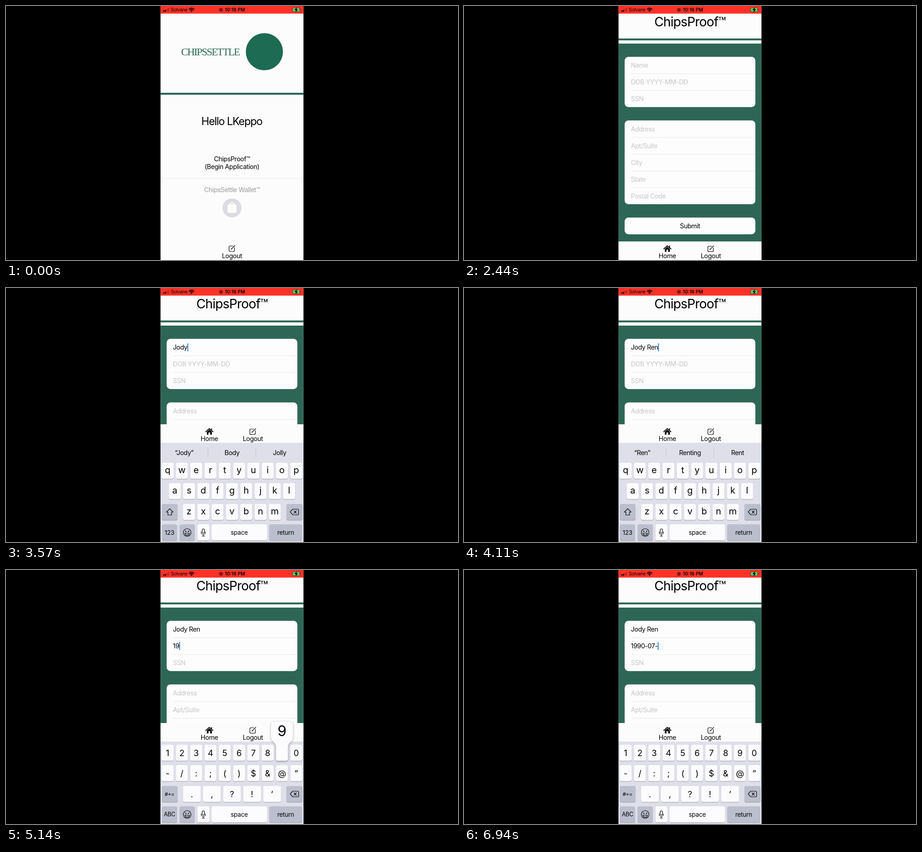
Recreate the animation shown at these times as an HTML page. Size 998 by 561 pixels, loop 6.97 s.

```html
<!DOCTYPE html>
<html lang="en">
<head>
<meta charset="utf-8">
<title>Sign-up form</title>
<style>
  html, body { margin: 0; width: 100%; height: 100%; overflow: hidden; background: #000; }
  svg { display: block; width: 100vw; height: 100vh; }
  text { font: 14.3px Inter, "Open Sans", sans-serif; letter-spacing: -.03em; white-space: pre; }
  .mid, .key, .sym, .small { text-anchor: middle; }
  .key { font-size: 20px; letter-spacing: 0; }
  .sym { font-size: 18.5px; letter-spacing: 0; }
  .small { font-size: 13.6px; letter-spacing: -.02em; }
  .hint { fill: #c6c6ca; }
  .line { fill: none; stroke: #000; stroke-width: 1.2; stroke-linecap: round; stroke-linejoin: round; }
  .rule { stroke: #e9e9ee; }
  #pop { filter: drop-shadow(0 1px 2px rgba(0, 0, 0, .35)); }
</style>
</head>
<body>
<svg viewBox="0 0 998 561">
  <defs>
    <clipPath id="phone"><rect x="341.2" width="315.6" height="561"/></clipPath>
    <g id="logout">
      <path class="line" d="M2 -5.5H-4.5Q-6.5 -5.5 -6.5 -3.5V4.500Q-6.5 6.500 -4.5 6.500H3.500Q5.500 6.500 5.500 4.500V-2M-1.500 1.500L6.500 -6.500M-2 2.200L-1.500 .8"/>
      <text class="mid" y="21">Logout</text>
    </g>
  </defs>
  <rect width="998" height="561"/>
  <g clip-path="url(#phone)">
    <rect x="341" width="316" height="561" fill="#fcfcfc"/>

    <g id="home">
      <text class="mid" x="451" y="109" fill="#2b6a57" style="font:23px 'Liberation Serif',serif;letter-spacing:-1.8px">CHIPSSETTLE</text>
      <circle cx="570.5" cy="101" r="41" fill="#1d6b52"/>
      <rect x="341" y="191.700" width="316" height="4.200" fill="#276354"/>
      <text class="mid" x="498.5" y="263" style="font-size:23.6px;letter-spacing:-.05em">Hello LKeppo</text>
      <text class="mid" x="499" y="343">ChipsProof™</text>
      <text class="mid" x="499" y="360">(Begin Application)</text>
      <path class="rule" d="M341 381H657"/>
      <text class="mid" x="499" y="411" fill="#9c9ca0">ChipsSettle Wallet™</text>
      <circle cx="499" cy="446" r="21" fill="#dbdbe1"/>
      <rect x="489" y="438" width="20" height="19" rx="4" fill="#fcfcfc"/>
      <path d="M494.500 439V438a4.500 4 0 0 1 9 0V439" fill="none" stroke="#fcfcfc" stroke-width="1.8"/>
      <use href="#logout" x="499" y="535.5"/>
    </g>

    <g id="auth">
      <rect x="341" y="83" width="316" height="440" fill="#2e6655"/>
      <text class="mid" x="499" y="45" style="font-size:28.400px">ChipsProof™</text>
      <rect x="341" y="71.700" width="316" height="4.200" fill="#2e6655"/>
      <g id="cards"></g>
      <rect x="354.7" y="467.2" width="288.6" height="37" rx="8.4" fill="#fdfdfe"/>
      <text class="mid" x="499" y="491">Submit</text>
      <rect id="caret" width="2" height="18" rx="1" fill="#2c83d6"/>
      <g id="nav">
        <rect x="341" y="520" width="316" height="41" fill="#fcfcfc"/>
        <path d="M441 536.500L449 529.500L457 536.500M454 533V529.500" class="line" style="stroke-width:1.7"/>
        <path d="M443.500 536.500L449 531.800L454.500 536.500V543H451V538H447V543H443.500Z"/>
        <text class="mid" x="449" y="557">Home</text>
        <use href="#logout" x="545" y="536"/>
      </g>
      <rect id="board" x="341" width="316" height="230" fill="#dedfe9"/>
      <g id="keys">
        <g id="letters"></g>
        <g id="numbers"></g>
        <g id="shared"></g>
      </g>
      <g id="pop"><path id="bubble" fill="#fcfcfe"/><text id="glyph" class="mid" style="font-size:32px;letter-spacing:0"></text></g>
    </g>

    <g id="status">
      <rect x="341" width="316" height="16.800" fill="#ff3127"/>
      <path d="M347 10h2.500v2.500h-2.500zM350.500 8.500h2.500v4h-2.500z"/>
      <path d="M354 6.500h2.500v6h-2.500zM357.500 4.500h2.500v8h-2.500z" opacity=".3"/>
      <text x="364" y="12.300" style="font-size:10.300px">Solvane</text>
      <path class="line" style="stroke-width:1.8;stroke-linecap:butt" d="M404 7.500Q409.500 2 415.500 7.500M406.200 9.700Q409.700 6.300 413.300 9.700"/>
      <circle cx="409.700" cy="11.300" r="1.500"/>
      <circle cx="474.700" cy="8.600" r="3.600" fill="none" stroke="#000"/>
      <circle cx="474.700" cy="8.600" r="1.700"/>
      <text class="mid" x="505.500" y="12.300" style="font-size:10.400px;font-weight:600;letter-spacing:0">10:16 PM</text>
      <rect x="633" y="4" width="15.500" height="8.500" rx="2" fill="#58d866" stroke="#6b2a20"/>
      <path d="M649.500 6.500v3.500" stroke="#6b2a20" stroke-width="1.5"/>
      <path d="M642.500 2.800L636.500 9h3.700L639 13.700L645 7.500h-3.700Z"/>
    </g>
  </g>
</svg>
<script>
const LOOP = 6970, OPEN = 920, FOCUS = 2490, SWITCH = 4440, HOLD = 90;
const TALL = 219, SHORT = 182, PITCH = 31.57;
const ROWS = [386, 431, 477, 522];
const $ = id => document.getElementById(id);

const label = (x, y, str, cls, id = '') =>
  `<text x="${x}" y="${y}" class="${cls}" ${id && `id="${id}"`}>${str}</text>`;

// Form cards
const card = (top, fields) => {
  let out = `<rect x="354.7" y="${top}" width="288.6" height="${fields.length * 37}" rx="8.4" fill="#fdfdfe"/>`;
  fields.forEach((name, i) => {
    const y = top + i * 37;
    if (i) out += `<path class="rule" d="M368 ${y + .5}H643"/>`;
    out += label(368.5, y + 24, name, 'hint', 'f' + name.slice(0, 3));
  });
  return out;
};
$('cards').innerHTML = card(112.2, ['Name', 'DOB YYYY-MM-DD', 'SSN']) +
  card(252.8, ['Address', 'Apt/Suite', 'City', 'State', 'Postal Code']);

// Keyboards
const spots = { letters: {}, numbers: {} };
const cap = (x, top, w, fill = '#fcfcfe', id = '') =>
  `<rect x="${x}" y="${top + 1}" width="${w}" height="35.500" rx="4" fill="#9698a2"/>` +
  `<rect x="${x}" y="${top}" width="${w}" height="35.500" rx="4" fill="${fill}" ${id && `id="${id}"`}/>`;
const DARK = '#bbbfcd';
const row = (set, chars, r, first, cls, base, pitch = PITCH, w = 26.5) =>
  [...chars].map((c, i) => {
    const x = first + i * pitch;
    spots[set][c] = [x, ROWS[r]];
    return cap(x - w / 2, ROWS[r], w) + label(x, ROWS[r] + base, c === '&' ? '&amp;' : c, cls);
  }).join('');

$('letters').innerHTML =
  '<path d="M446 353V374M551.500 353V374" stroke="#c3c5d0"/>' +
  [393.5, 499, 604].map((x, i) => label(x, 369, '', 'mid', 's' + i)).join('') +
  row('letters', 'qwertyuiop', 0, 356.8, 'key', 23) +
  row('letters', 'asdfghjkl', 1, 372.6, 'key', 23) +
  row('letters', 'zxcvbnm', 2, 404.1, 'key', 23) +
  cap(344, 477, 35, DARK, 'shift') +
  '<path id="arrow" class="line" d="M361.500 487.500L369 495H365.500V501.500H357.500V495H354Z"/>' +
  label(361, 545, '123', 'small');
$('numbers').innerHTML =
  row('numbers', '1234567890', 0, 356.8, 'sym', 24.5) +
  row('numbers', '-/:;()$&@”', 1, 356.8, 'sym', 24.5) +
  row('numbers', '.,?!’', 2, 410.5, 'sym', 24.5, 44.25, 39.5) +
  cap(344, 477, 35, DARK) +
  '<text x="361" y="499" class="small" style="font-size:11px;font-weight:500">#+=</text>' +
  '<text x="361" y="544" class="small" style="font-size:12.5px">ABC</text>';
$('shared').innerHTML =
  cap(619, 477, 35.5, DARK) +
  '<path class="line" d="M627.500 494.500L633 488.500H644Q646 488.500 646 490.500V499Q646 501 644 501H633ZM636 492L641 497.500M641 492L636 497.500"/>' +
  cap(383, 522, 34, DARK) +
  '<circle class="line" cx="400" cy="540" r="8.500"/><circle cx="397" cy="537.500" r="1.300"/><circle cx="403" cy="537.500" r="1.300"/>' +
  '<path class="line" d="M395 541.500H405Q404 546 400 546T395 541.500Z"/>' +
  cap(422.5, 522, 26.5) +
  '<rect class="line" x="433.200" y="532" width="5" height="9.500" rx="2.500"/>' +
  '<path class="line" d="M431 538.500V540a4.700 4.500 0 0 0 9.400 0V538.500M435.700 544.500V548M433 548H438.500"/>' +
  cap(454, 522, 122) + label(515, 544.5, 'space', 'small') +
  cap(581, 522, 73, DARK) + label(617.5, 544.5, 'return', 'small');
// The 123 / ABC key cap sits beneath both labels
$('keys').insertAdjacentHTML('afterbegin', cap(344, 522, 34, DARK));

// Typing
const typing = (str, times) => [...str].map((c, i) => ({ c, at: times[i] }));
const NAME = typing('Jody Ren', [2840, 3030, 3220, 3400, 3560, 3700, 3850, 3990]);
const BIRTH = typing('1990-07-', [4780, 4960, 5100, 5330, 5680, 6020, 6290, 6590]);
const HINTS = { '': ['I', 'The', 'I’m'], J: ['“J”', 'Just', 'Job'], Jo: ['“Jo”', 'Job', 'Join'],
  Jod: ['“Jod”', 'Job', 'Joy'], Jody: ['“Jody”', 'Body', 'Jolly'], R: ['“R”', 'Really', 'Right'],
  Re: ['“Re”', 'Really', 'Red'], Ren: ['“Ren”', 'Renting', 'Rent'] };

const typed = (list, t) => list.filter(k => t >= k.at + HOLD).map(k => k.c).join('');
const ease = p => 1 - (1 - Math.min(1, Math.max(0, p))) ** 3;
const show = (id, on) => $(id).setAttribute('display', on ? 'inline' : 'none');
const shiftY = (id, y) => $(id).setAttribute('transform', `translate(0 ${y})`);
const put = (el, str) => { if (el.textContent !== str) el.textContent = str; };

const fill = (id, str, hint) => {
  const el = $(id);
  put(el, str || hint);
  el.style.fill = str ? '#000' : '';
  return str ? el.getComputedTextLength() : 0;
};

function drawPop(press, set) {
  const spot = press && spots[set][press.c.toLowerCase()];
  show('pop', spot);
  if (!spot) return;
  const [x, top] = spot, b = Math.min(632, Math.max(366, x));
  const l = b - 24.3, r = b + 24.3, kl = x - 13.2, kr = x + 13.2, y = top - 51;
  $('bubble').setAttribute('d',
    `M${l} ${y + 8}Q${l} ${y} ${l + 8} ${y}H${r - 8}Q${r} ${y} ${r} ${y + 8}V${y + 34}` +
    `C${r} ${y + 45} ${kr} ${y + 45} ${kr} ${y + 56}V${top + 31}Q${kr} ${top + 35.5} ${kr - 4} ${top + 35.5}` +
    `H${kl + 4}Q${kl} ${top + 35.5} ${kl} ${top + 31}V${y + 56}C${kl} ${y + 45} ${l} ${y + 45} ${l} ${y + 34}Z`);
  const glyph = $('glyph');
  put(glyph, press.c);
  glyph.setAttribute('x', b);
  glyph.setAttribute('y', top - 19);
}

function draw(t) {
  show('home', t < OPEN);
  show('auth', t >= OPEN);
  if (t < OPEN) return;

  const birth = t >= SWITCH;
  const lift = birth ? TALL - (TALL - SHORT) * ease((t - SWITCH) / 200) : TALL * ease((t - FOCUS) / 280);
  shiftY('nav', -lift);
  $('board').setAttribute('y', 561 - lift);
  shiftY('keys', birth ? 0 : TALL - lift);
  show('letters', !birth);
  show('numbers', birth);

  const name = typed(NAME, t), date = typed(BIRTH, t);
  const nameWidth = fill('fNam', name, 'Name'), dateWidth = fill('fDOB', date, 'DOB YYYY-MM-DD');
  show('caret', t >= FOCUS);
  $('caret').setAttribute('x', 368.5 + (birth ? dateWidth : nameWidth));
  $('caret').setAttribute('y', birth ? 159 : 122);

  const caps = !name || name.endsWith(' ');
  for (const el of document.querySelectorAll('#letters .key'))
    put(el, caps ? el.textContent.toUpperCase() : el.textContent.toLowerCase());
  $('shift').setAttribute('fill', caps ? '#fcfcfe' : DARK);
  $('arrow').style.fill = caps ? '#000' : 'none';
  HINTS[name.split(' ').pop()].forEach((word, i) => put($('s' + i), word));

  const press = (birth ? BIRTH : NAME).find(k => t >= k.at && t < k.at + HOLD);
  drawPop(press, birth ? 'numbers' : 'letters');
}

const start = performance.now();
function tick() {
  draw((performance.now() - start) % LOOP);
  requestAnimationFrame(tick);
}
tick();
</script>
</body>
</html>
```
